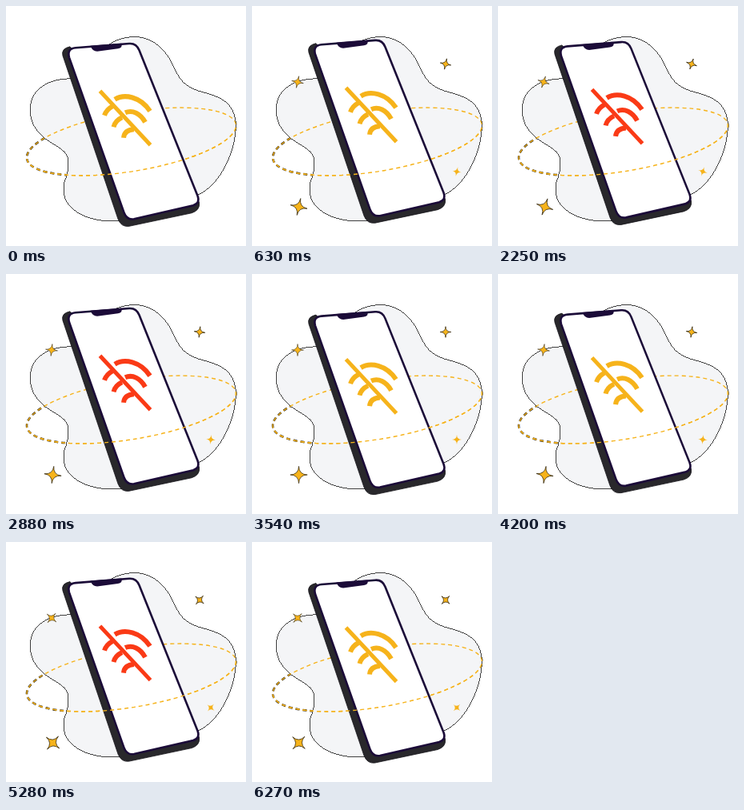
Animation of 300 by 300 pixels, one loop 6330 ms. Source, as an HTML page:

```html
<!DOCTYPE html>
<html lang="en">
<head>
<meta charset="utf-8">
<title>No connection</title>
<style>
  html, body { margin: 0; width: 100%; height: 100%; overflow: hidden; background: #fff; }
  svg { display: block; width: 100%; height: 100%; }
</style>
</head>
<body>
<svg viewBox="0 0 300 300">
  <defs>
    <path id="orbit" d="M-132.4 0A132.4 37 0 0 0 132.4 0A132.4 37 0 0 0 -132.4 0"
      transform="translate(156.7 169.5) rotate(-9.4)" pathLength="576"/>
    <path id="front" d="M-132.4 0A132.4 37 0 0 0 132.4 0"
      transform="translate(156.7 169.5) rotate(-9.4)" pathLength="288"/>
    <path id="star" d="M0-11Q.3-.3 11 0Q.3 .3 0 11Q-.3 .3-11 0Q-.3-.3 0-11Z"/>
  </defs>

  <use class="dash" href="#orbit" fill="none" stroke="#16130c" stroke-width="2.5"/>
  <path fill="#f4f5f7" stroke="#111" stroke-width=".8" shape-rendering="crispEdges"
    d="M161 38.5C186 39 202 58 210 77C218 94 224 100 240 106C266 113 285 118 287.5 148
       C287 185 266 225 240 236C205 246 187 266 145 268.5C104 272 74 256 72 232
       C71 216 79 211 78 195C78 177 56 175 43 160C30 148 28 130 32 118
       C37 101 58 90 82 91C104 89 112 39 161 38.5Z"/>
  <use class="dash" href="#orbit" fill="none" stroke="#f6b31b" stroke-width="1.4"/>

  <g id="phone">
    <path fill="#29282c" stroke="#151318" stroke-width=".8"
      d="M80 51.5Q68.5 54 71 63L140 267Q144 277.5 154 276L232 259.5Q243 256 241.5 246L232 230Z"/>
    <path fill="#fff" stroke="#1b0b38" stroke-width="2.6" stroke-linejoin="round"
      d="M87 53L154 47.7Q163 47 166.5 56L239.5 238Q243 247 234 250L160 267
         Q151 268.5 147.5 259L79 65Q76 54 87 53Z"/>
    <path fill="#1b0b38" d="M105.5 50.5L144.5 47.5Q146 53 140 54L114 57.5Q108 57.5 105.5 50.5Z"/>
    <g id="signal" fill="none" stroke-width="6">
      <path d="M117.5 107L180.5 174.5" stroke-width="5"/>
      <path d="M136 117.5C148 110 168 114 180 132"/>
      <path d="M149 134C158 130 168 135 174 146"/>
      <path d="M123 137.5Q125.5 130 133 126"/>
      <path d="M134.5 152Q136.5 144 145 140"/>
      <path d="M147 165.5Q148 155.5 160 155"/>
    </g>
  </g>

  <use class="dash" href="#front" fill="none" stroke="#f6b31b" stroke-width="1.4"/>
  <g id="stars" fill="#f6b31b"></g>
</svg>
<script>
const LOOP = 6330, STEP = 30, STEPS = LOOP / STEP;
const byId = id => document.getElementById(id);
const phone = byId('phone'), signal = byId('signal');
const dashes = document.querySelectorAll('.dash');

function addStar(x, y, size, edge) {
  const el = document.createElementNS('http://www.w3.org/2000/svg', 'use');
  el.setAttribute('href', '#star');
  el.setAttribute('stroke', '#2b2008');
  el.setAttribute('stroke-width', edge / size);
  byId('stars').append(el);
  return { el, x, y, size };
}
const stars = [
  addStar(57, 95, .68, .5),
  addStar(242, 72.5, .62, .7),
  addStar(256, 207, .54, 0),
  addStar(58.5, 251, .97, .7),
];

const clamp = v => Math.min(1, Math.max(0, v));
const wave = (at, peak, period) => Math.cos(2 * Math.PI * (at - peak) / period);
const blend = (a, b, p) => Math.round(a + (b - a) * p);

function draw(ms) {
  const at = Math.floor(ms % LOOP / STEP);

  // The phone bobs, then rests at its low point until the loop ends.
  const lift = 2.5 * (1 + wave(Math.min(at, 190), 25, 66));
  phone.setAttribute('transform', `translate(0 ${-lift})`);

  const alarm = clamp(.5 + 2.8 * wave(at, 75, 104));
  signal.setAttribute('stroke',
    `rgb(${blend(246, 250, alarm)}, ${blend(179, 58, alarm)}, ${blend(27, 22, alarm)})`);

  for (const dash of dashes) {
    dash.setAttribute('stroke-dasharray', '5 4');
    dash.setAttribute('stroke-dashoffset', -at / STEPS * 90);
  }

  // The stars pop in, then sway ever wider.
  const angle = 25 * Math.sqrt(at / STEPS) * (1 + wave(at, 44, 148));
  const scale = Math.sin(clamp(at / 18) * Math.PI / 2);
  for (const { el, x, y, size } of stars) {
    el.setAttribute('transform', `translate(${x} ${y}) rotate(${angle}) scale(${size * scale})`);
    el.setAttribute('visibility', scale ? 'visible' : 'hidden');
  }
}

const start = performance.now();
function tick(now) {
  draw(Math.max(0, now - start));
  requestAnimationFrame(tick);
}
draw(0);
requestAnimationFrame(tick);
</script>
</body>
</html>
```
